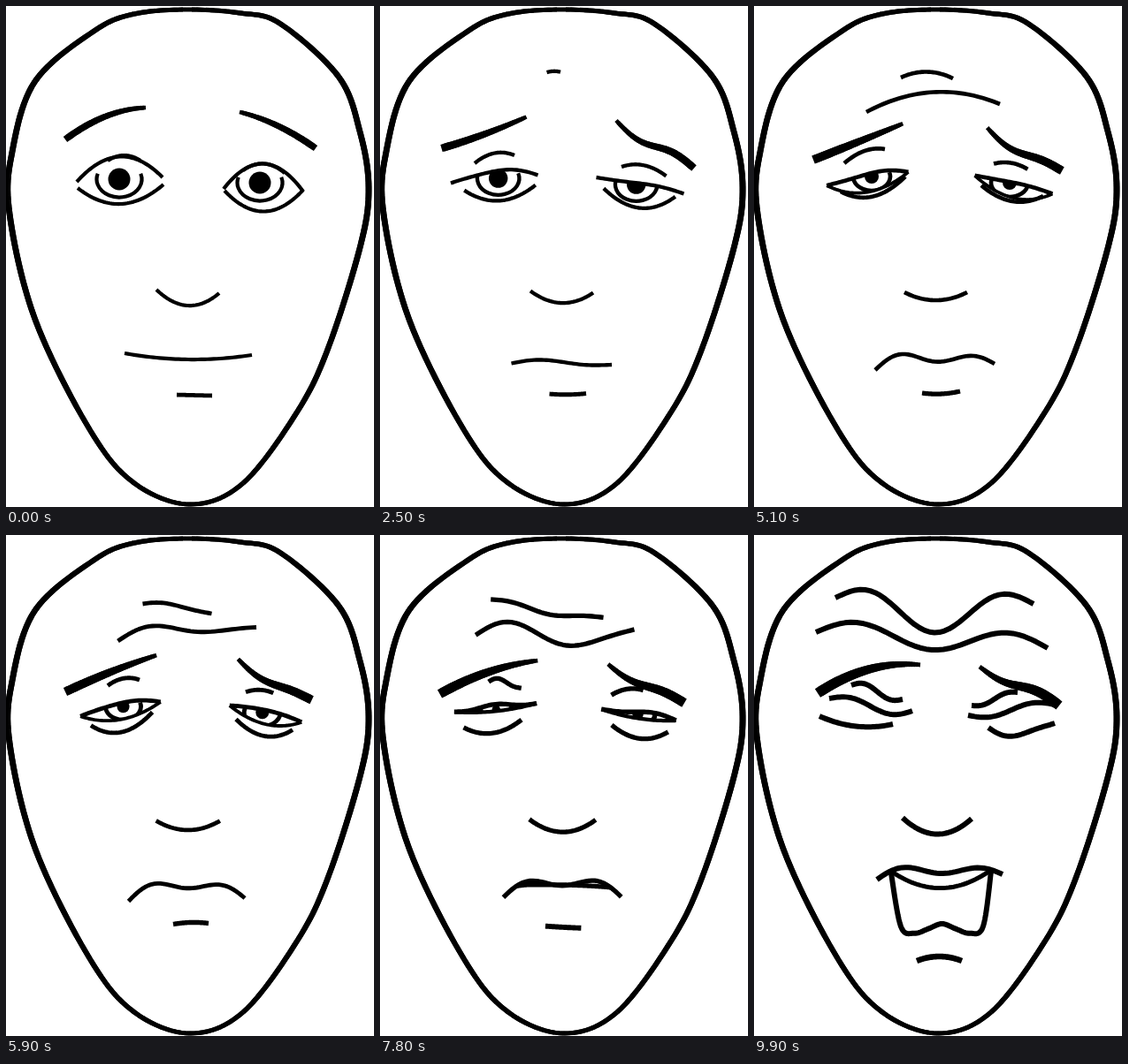
Write an HTML page with a canvas that moves like this. It is 416x567 px and loops after 10000 ms.

```html
<!DOCTYPE html>
<html lang="en">
<head>
<meta charset="utf-8">
<title>Changing face</title>
<style>
  html, body { margin: 0; width: 100%; height: 100%; overflow: hidden; background: #fff; }
  canvas { display: block; }
</style>
</head>
<body>
<canvas id="stage" width="416" height="567"></canvas>
<script>
const ctx = document.getElementById('stage').getContext('2d');
const LOOP = 10000, STEP = 100, LAST = LOOP - STEP;
const { PI, sin, cos, abs, min, max } = Math;

// Each pose of a stroke, keyed by time in ms: x1, y1, x2, y2, bow, wave, ripple.
const leftBrow = {
  0: [67, 151, 158, 115, -8],
  1300: [72, 154, 166, 123],
  3700: [67, 168, 165, 128, 4],
  6700: [67, 181, 172, 139, -4],
  8800: [68, 179, 184, 145, -8],
  9900: [72, 179, 188, 147, -11]
};
const rightBrow = {
  0: [350, 161, 264, 120, -5],
  1300: [357, 181, 268, 126, -1, -5],
  3700: [353, 186, 266, 133, 6, -5],
  6700: [343, 187, 261, 143, 6, -2],
  8800: [345, 193, 255, 149, 0, -4]
};
const nose = {
  0: [170, 321, 241, 325, 16],
  5100: [170, 324, 241, 324, 9],
  9900: [168, 320, 246, 321, 18]
};
const mouth = {
  0: [134, 393, 278, 395, 6],
  1300: [150, 404, 262, 405],
  3700: [147, 405, 262, 407, -5, -5],
  5100: [137, 412, 272, 405, -12, -3, 6],
  6700: [140, 417, 268, 417, -25, 0, 5],
  8800: [139, 404, 277, 403, -14, 0, 7],
  9900: [139, 390, 281, 384, -9, -2, 5]
};
const jaw = {
  7700: [165, 395, 253, 396, -2],
  8800: [165, 406, 255, 420, 8],
  9900: [166, 443, 259, 443, 3, 0, -6]
};
const chin = {
  0: [193, 440, 233, 441],
  5100: [190, 438, 233, 436, 2],
  6700: [188, 443, 225, 443, -5],
  7700: [187, 442, 227, 444],
  8800: [186, 449, 231, 453, 2],
  9900: [184, 482, 235, 482, -5]
};
const wrinkles = [
  {
    2300: [192, 74, 201, 74],
    3700: [168, 82, 222, 79, -8],
    5100: [166, 81, 225, 82, -7],
    6700: [143, 75, 240, 96, 0, -3],
    8800: [109, 71, 264, 91, 8, 0, 4],
    9900: [92, 71, 316, 78, 17, 0, 19]
  },
  {
    4000: [196, 99, 206, 99],
    5100: [127, 120, 278, 111, -18],
    6700: [126, 120, 288, 98, 5, -13, 5],
    8800: [92, 107, 287, 115, 6, -11, 7],
    9900: [70, 110, 332, 128, -2, 0, 13]
  }
];
// A pupil is x, y, radius.
const eyes = [
  {
    lid: {
      0: [80, 199, 177, 194, -26],
      1300: [81, 201, 183, 197, -15],
      3700: [79, 200, 174, 186, -3, 3],
      6700: [86, 207, 175, 190, -8],
      8800: [82, 194, 179, 191, 3, 0, -3],
      9900: [85, 185, 179, 199, 2, -6]
    },
    fold: {
      0: [115, 175, 152, 175, -6],
      1300: [109, 177, 158, 175, -10],
      3700: [105, 179, 146, 163, -4],
      5100: [102, 178, 148, 162, -6],
      6700: [128, 163, 154, 166, -4],
      8800: [118, 169, 165, 180, -4, -5],
      9900: [110, 170, 168, 186, -1, -5]
    },
    lower: {
      0: [81, 206, 178, 202, 20],
      1300: [94, 208, 178, 207, 15],
      5100: [98, 210, 171, 193, 14],
      6700: [94, 221, 160, 208, 16],
      8800: [95, 215, 160, 210, 6],
      9900: [74, 205, 157, 214, 7]
    },
    pupil: { 0: [128, 196, 12.5], 1300: [134, 196, 12], 5100: [133, 193, 8], 8300: [131, 198, 4] }
  },
  {
    lid: {
      0: [246, 207, 336, 210, -30],
      1300: [245, 198, 344, 211, -6, 1],
      3700: [244, 190, 343, 214, 1, 1],
      6700: [256, 194, 331, 211, -6],
      8800: [245, 200, 338, 209, -1, 4],
      9900: [242, 204, 340, 192, 0, 5]
    },
    fold: {
      0: [268, 186, 315, 189, -9],
      1300: [275, 184, 325, 190, -8],
      3700: [271, 180, 322, 195, -6],
      6700: [271, 177, 295, 173, -2],
      8800: [253, 185, 300, 178, -6],
      9900: [246, 193, 298, 178, 0, 3]
    },
    lower: {
      0: [247, 209, 336, 208, 24],
      1300: [251, 208, 337, 216, 20],
      5100: [257, 203, 327, 215, 12],
      6700: [263, 214, 321, 226, 14],
      8800: [261, 216, 330, 220, 9],
      9900: [265, 218, 340, 213, 10, 3]
    },
    pupil: { 0: [287, 200, 12.5], 1300: [290, 203, 12], 5100: [289, 200, 8], 8300: [292, 203, 6] }
  }
];
const head = [
  [205, 4], [145, 9], [100, 28], [33, 85], [7, 165], [4, 235], [33, 355], [95, 480], [145, 540],
  [208, 564], [268, 540], [330, 458], [365, 385], [401, 270], [410, 205], [400, 142], [376, 80],
  [310, 20], [265, 8]
];

const mix = (a, b, k) => a + (b - a) * k;
const progress = (t, from, to) => max(0, min(1, (t - from) / (to - from)));

// The pose at time t: null before its first key, held after its last.
function pose(keys, t) {
  const times = Object.keys(keys).map(Number);
  if (t < times[0]) return null;
  const i = max(0, times.findLastIndex(time => time <= t));
  const j = min(i + 1, times.length - 1);
  const a = keys[times[i]], b = keys[times[j]];
  const k = i === j ? 0 : progress(t, times[i], times[j]);
  return Array.from({ length: 7 }, (_, n) => mix(a[n] || 0, b[n] || 0, k));
}

// Point on a stroke at u from 0 to 1.
function point([x1, y1, x2, y2, bow = 0, wave = 0, ripple = 0], u) {
  const lift = bow * 4 * u * (1 - u) + wave * sin(2 * PI * u) - ripple * sin(3 * PI * u);
  return [mix(x1, x2, u), mix(y1, y2, u) + lift];
}

const curve = (p, count = 40) => Array.from({ length: count + 1 }, (_, i) => point(p, i / count));

// Catmull-Rom samples through the points.
function spline(pts, closed) {
  const n = pts.length, parts = 12, out = [];
  const at = i => pts[closed ? (i + n) % n : max(0, min(n - 1, i))];
  for (let i = 0; i < (closed ? n : n - 1); i++) {
    const [a, b, c, d] = [at(i - 1), at(i), at(i + 1), at(i + 2)];
    for (let s = 0; s <= parts; s++) {
      const u = s / parts;
      out.push(b.map((v, m) => v + u / 2 * (c[m] - a[m] +
        u * (2 * a[m] - 5 * v + 4 * c[m] - d[m] + u * (3 * (v - c[m]) + d[m] - a[m])))));
    }
  }
  return out;
}

function trace(pts) {
  ctx.beginPath();
  pts.forEach(p => ctx.lineTo(...p));
}

function line(pts, width) {
  trace(pts);
  ctx.lineWidth = width;
  ctx.stroke();
}

// Overlapping short pieces let the width vary along the way.
function brush(pts, width) {
  for (let i = 1; i < pts.length - 1; i++) {
    line(pts.slice(i - 1, i + 2), width(i / (pts.length - 1), pts[i][0]));
  }
}

function stroke(keys, t, width) {
  const p = pose(keys, t);
  if (p) line(curve(p), width);
}

function drawEye({ lid, fold, lower, pupil }, t, ink) {
  const top = pose(lid, t);
  const narrowing = t >= 5100;
  const rim = [...top.slice(0, 4), 15 * (1 - progress(t, 5100, 8800))];
  if (t < 8300) {
    const [x, y, r] = pose(pupil, t);
    const bottom = narrowing ? rim : pose(lower, t);
    ctx.save();
    trace([...curve(top), ...curve(bottom).reverse()]);
    ctx.clip();
    ctx.beginPath();
    ctx.ellipse(x, y, r + 13, r + 8, 0, -0.1 * PI, 1.1 * PI);
    ctx.lineWidth = ink;
    ctx.stroke();
    ctx.beginPath();
    ctx.arc(x, y, r, 0, 2 * PI);
    ctx.fill();
    ctx.restore();
  }
  line(curve(top), ink);
  if (narrowing && t < 8800) line(curve(rim), ink * 0.8);
  stroke(fold, t, ink);
  stroke(lower, t, ink);
}

function drawMouth(t, ink) {
  const lip = pose(mouth, t), low = pose(jaw, t);
  line(curve(lip), ink);
  if (!low) return;
  const left = point(lip, 0.11), right = point(lip, 0.91);
  line(spline([left, ...curve(low, 6), right]), ink);
  const open = progress(t, 8800, LAST);
  if (open > 0) line(curve([...left, ...right, 20 * open]), ink * 0.85);
}

const outline = spline(head, true);

function draw(t) {
  const age = t / LAST;
  const ink = 4.2 + 1.8 * age * age;
  const browWidth = u => 4.5 + (3 + 4 * age) * cos(u * PI / 2);
  ctx.fillStyle = '#fff';
  ctx.fillRect(0, 0, 416, 567);
  ctx.fillStyle = ctx.strokeStyle = '#000';
  ctx.lineJoin = 'round';
  brush(outline, (u, x) => 4.8 + 2 * abs(x - 207) / 207);
  brush(curve(pose(leftBrow, t)), browWidth);
  brush(curve(pose(rightBrow, t)), browWidth);
  eyes.forEach(e => drawEye(e, t, ink));
  wrinkles.forEach(w => stroke(w, t, ink));
  stroke(nose, t, ink);
  drawMouth(t, ink);
  stroke(chin, t, ink + 0.6);
}

function tick() {
  draw(Math.floor(performance.now() % LOOP / STEP) * STEP);
  requestAnimationFrame(tick);
}
tick();
</script>
</body>
</html>
```
